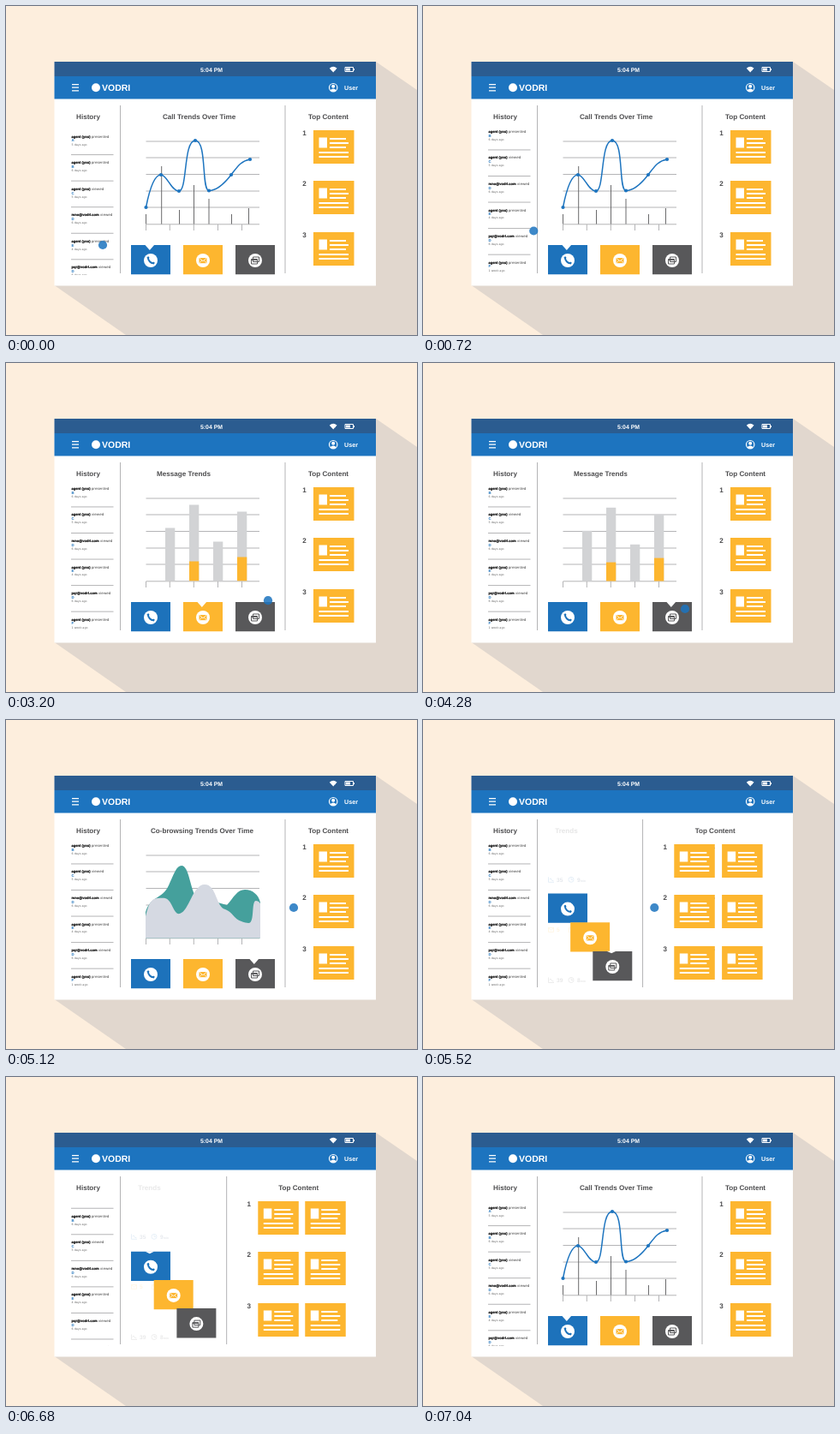
Animation of 480x384 px, one loop 7200 ms. Source, as an HTML page:

```html
<!DOCTYPE html>
<html lang="en">
<head>
<meta charset="utf-8">
<title>Dashboard walkthrough</title>
<style>
  html, body { margin: 0; width: 100%; height: 100%; overflow: hidden; background: #fdeedd; }
  svg { display: block; width: 480px; height: 384px; }
  text { font-family: "Liberation Sans", Arial, sans-serif; font-weight: bold; fill: #4d4d4f; text-rendering: geometricPrecision; }
  .head { font-size: 8.1px; }
  .mid { text-anchor: middle; }
  .white { fill: #fff; }
  .verb { font: 4.1px "DejaVu Sans", sans-serif; fill: #444; }
  .ago { font: 3.3px "DejaVu Sans", sans-serif; fill: #666; }
  .rule { stroke: #b4b4b6; fill: none; }
  .line { fill: none; stroke: #fff; }
</style>
</head>
<body>
<svg viewBox="0 0 480 384">
  <defs>
    <g id="card">
      <path d="M0 0H47.5V39H0z" fill="#fdb62f"/>
      <path d="M6.5 8.5H16V20.5H6.5z" fill="#fff"/>
      <path class="line" stroke-width="2" d="M19 10H38M19 15H41M19 20H38M6.5 26H41M6.5 31H41"/>
    </g>
    <clipPath id="listClip"><rect x="74" y="143" width="54" height="171"/></clipPath>
    <clipPath id="plotClip"><rect x="160" y="140" width="140" height="114.5"/></clipPath>
  </defs>

  <path fill="#fdeedd" d="M0 0H480V384H0z"/>
  <path fill="#e1d7ce" d="M432 65L480 98V384H140L56.5 326z"/>
  <path fill="#fff" d="M56.5 65H432V326.5H56.5z"/>
  <path fill="#2b5c90" d="M56.5 65H432V82H56.5z"/>
  <path fill="#1d74bf" d="M56.5 82H432V108.5H56.5z"/>

  <text class="white mid" x="240" y="76.5" font-size="6.9">5:04 PM</text>
  <path class="line" stroke-width="1.5" d="M378.3 73.2Q382.2 69.8 386.1 73.2M379.8 74.9Q382.2 72.9 384.6 74.9"/>
  <path class="white" d="M378.5 73Q382.2 70 386 73L382.2 77.5z"/>
  <path class="line" d="M396 71.5H405.5V76.5H396zM406.5 73V75.2"/>
  <path class="white" d="M397 72.5H402V75.5H397z"/>
  <path class="line" stroke-width="1.2" d="M77 91.6H85M77 95.2H85M77 98.8H85"/>
  <circle class="white" cx="105" cy="95.2" r="5"/>
  <text class="white" x="112" y="98.8" font-size="10.5">VODRI</text>
  <circle class="line" stroke-width="1.2" cx="382.2" cy="95.2" r="4.7"/>
  <circle class="white" cx="382.2" cy="93.8" r="2"/>
  <path class="white" d="M378.6 98.3Q382.2 94.6 385.8 98.3Q382.2 101.8 378.6 98.3z"/>
  <text class="white" x="395" y="98.2" font-size="7.2">User</text>

  <path class="rule" d="M133.5 116V312"/>
  <text class="head mid" x="96" y="132">History</text>
  <g clip-path="url(#listClip)"><g id="list"></g></g>

  <g id="chart">
    <path class="rule" stroke="#c4c4c6" d="M163.5 158H296M163.5 177H296M163.5 196.5H296M163.5 216H296M163.5 235H296M163.5 254.8H296"/>
    <path class="rule" d="M163.5 255V262M191.3 255V262M219.3 255V262M247.5 255V262M275.5 255V262"/>
    <g clip-path="url(#plotClip)">
      <path id="sticks" fill="none" stroke="#6b6b6d" d="M163.5 255V243M181.7 255V187M202.5 255V238M219.5 255V209M237 255V225M263.5 255V243M283.5 255V236"/>
      <g id="grey" fill="#d2d3d5"></g>
      <g id="gold" fill="#fdb62f"></g>
      <g id="area">
        <path fill="#45a09c" d="M163 255V224C170 204 182 210 190 193C196 180 199 170 205 170C214 170 215 198 222 206L258 216C266 207 270 198 279 198C288 198 295 204 297 213V255z"/>
        <path fill="#d5d9e2" d="M163 255V229C166 217 169 208 177 208C185 208 188 206 193 215C197 223 199 227 203 226C214 223 218 192 232 192C246 192 245 218 256 221C268 226 264 234 283 237C291 238 286 211 292 211Q295 211 297 214V255z"/>
      </g>
    </g>
    <path id="curve" pathLength="100" stroke-dasharray="100 200" fill="none" stroke="#1d74bf" stroke-width="1.5" d="M163.5 235C168 212 174 197 181 197S193 216 202 216C212 216 207 157 221 157C235 157 228 215.5 237 215.5C246 215.5 256 206 263 197C270 188 274 181 285 179"/>
    <g id="nodes" fill="#1d74bf"></g>
  </g>
  <g id="titles"></g>
  <text id="trends" class="head mid" x="167.5" y="132">Trends</text>

  <g id="stats"></g>
  <g id="tabs"></g>

  <path id="divider" class="rule" d="M0 116V312"/>
  <text id="top" class="head mid" y="132">Top Content</text>
  <g id="cards"></g>
  <circle id="dot" fill="#1d74bf" fill-opacity=".86"/>
</svg>

<script>
const LOOP = 7200, STEP = 40;
const BLUE = '#1d72bb', GOLD = '#fdb62f', GREY = '#58585a';
const $ = id => document.getElementById(id);
const ramp = (t, a, b) => Math.min(1, Math.max(0, (t - a) / (b - a)));
const mix = (a, b, p) => a + (b - a) * p;
const show = (el, v) => el.setAttribute('opacity', Math.min(1, Math.max(0, v)));
const move = (el, x, y) => el.setAttribute('transform', `translate(${x} ${y})`);

// History
const you = 'agent (you)';
const history = [
  [you, 'presented', 'A', '5 days'], [you, 'presented', 'B', '6 days'], [you, 'viewed', 'C', '5 days'],
  ['mno@vodri.com', 'viewed', 'D', '6 days'], [you, 'presented', 'E', '4 days'],
  ['pqr@vodri.com', 'viewed', 'D', '6 days'], [you, 'presented', 'F', '1 week']
];
$('list').innerHTML = history.map(([who, verb, item, age], i) => {
  const y = 153.6 + i * 30.55;
  return `<text x="76.5" y="${y}" font-size="4.1" style="fill:#111;stroke:#111;stroke-width:.2">${who}
    <tspan class="verb" stroke="none">${verb}</tspan></text>
    <text x="76.5" y="${y + 4.8}" font-size="4.3" style="fill:${BLUE}">${item}</text>
    <text class="ago" x="76.5" y="${y + 8.9}">${age} ago</text>
    <path class="rule" d="M76 ${y + 20}H125.5"/>`;
}).join('');

// Charts
const bar = (x, h) => `<rect x="${x}" y="${254.5 - h}" width="11.3" height="${h}"/>`;
$('grey').innerHTML = bar(186, 62) + bar(214, 89) + bar(242, 46) + bar(270, 81);
$('gold').innerHTML = bar(214, 23) + bar(270, 28);
const knots = [[163.5, 235], [181, 197], [202, 216], [221, 157], [237, 215.5], [263, 197], [285, 179]];
$('nodes').innerHTML = knots.map(([x, y]) => `<circle cx="${x}" cy="${y}" r="2.1"/>`).join('');

const titles = [['Call Trends Over Time', 183, 87], ['Message Trends', 176, 65], ['Co-browsing Trends Over Time', 169, 123]];
$('titles').innerHTML = titles.map(([label, x, w], i) =>
  `<clipPath id="wipe${i}"><rect x="${x}" y="122" width="${w}" height="14"/></clipPath>
   <text class="head" x="${x}" y="132" clip-path="url(#wipe${i})">${label}</text>`).join('');
const wipes = titles.map((_, i) => $('wipe' + i).firstChild);

// Buttons, centred on their round icons
const icons = [
  `<path fill="none" stroke="${BLUE}" stroke-width="2" stroke-linecap="round" d="M-3-3.2C-3.2 0 0 3.4 3.2 3.2"/>
   <path stroke="${BLUE}" stroke-width="2.2" d="M-3.9-2.6L-2.1-4M2.6 3.9L4 2.1"/>`,
  `<path fill="${GOLD}" d="M-4.5-3H4.5V3.2H-4.5z"/><path class="line" stroke-width=".8" d="M-4.5-3L0 .8L4.5-3M-4.5 3.2L-1.3 0M4.5 3.2L1.3 0"/>`,
  `<path fill="#fff" stroke="${GREY}" d="M-2.5-4H4.5V1.5H-2.5zM-4.5-1.5H2.5V4H-4.5z"/><path stroke="${GREY}" d="M-4.5-.6H2.5"/>`
];
const colors = [BLUE, GOLD, GREY];
$('tabs').innerHTML = icons.map((icon, i) =>
  `<g><path fill="${colors[i]}" d="M-23-18H23V16.3H-23z"/><path class="white" d="M-5.5-18.3H5.5L0-12z"/>
   <circle class="white" r="8"/>${icon}</g>`).join('');
const tabs = [...$('tabs').children];

const counts = [['35', '9', 'min'], ['5', '2', ''], ['39', '8', 'min']];
const graph = '<path d="M.5-3V3H7M1.5 0L3-1.5L4.5 1L6.5 1.5"/>';
const clock = '<circle cx="27" r="3"/><path d="M27-2V0H29"/>';
const mail = '<path d="M.5-2.5H6.5V2.5H.5zL3.5.5L6.5-2.5"/>';
const diary = '<path d="M24.5-2.5H29.5V3H24.5zM24.5-1H29.5M26-3.3V-2M28-3.3V-2"/>';
$('stats').innerHTML = counts.map(([a, b, unit], i) =>
  `<g transform="translate(146 ${186.3 + i * 58.6})"><g fill="none" stroke="${colors[i]}" stroke-width=".8">${i === 1 ? mail + diary : graph + clock}</g>
   <g font-size="6.6"><text x="10" y="2.4" style="fill:${i ? colors[i] : '#44587a'}">${a}</text>
   <text x="34" y="2.4" style="fill:${i ? colors[i] : '#44587a'}">${b}<tspan font-size="3.6">${unit}</tspan></text></g></g>`).join('');

// Content cards: second column lies beneath the first
const rows = [145, 204, 264];
const column = first => '<g>' + rows.map((y, i) =>
  `<use href="#card" y="${y}"/><text class="head mid" x="-10.5" y="${y + 6}">${first + i}</text>`).join('') + '</g>';
$('cards').innerHTML = column(4) + column(1);
const [back, front] = $('cards').children;

const path = [
  [0, 113, 279], [280, 113, 259], [680, 113, 259], [1000, 243, 287], [1920, 243, 287], [2480, 306, 264],
  [3040, 306, 264], [3320, 306, 287], [4560, 306, 287], [5120, 336, 219], [5200, 336, 219], [5760, 221, 219], [6400, 221, 219]
];

function drawDot(t) {
  const dot = $('dot');
  show(dot, t < 6400 ? 1 : 0);
  const k = path.findIndex(p => p[0] > t);
  if (k < 1) return;
  const [a, b] = [path[k - 1], path[k]], p = ramp(t, a[0], b[0]);
  const pulse = Math.sin(Math.PI * ramp(t, 1160, 1480)) + Math.sin(Math.PI * ramp(t, 3520, 3840));
  dot.setAttribute('cx', mix(a[1], b[1], p));
  dot.setAttribute('cy', mix(a[2], b[2], p));
  dot.setAttribute('r', 5.1 + 2 * pulse);
}

function draw(t) {
  const reset = ramp(t, 6400, 7040);
  const open = ramp(t, 5200, 5760) - reset;
  const lineOn = 1 - ramp(t, 1160, 1680) + reset;
  const barsOut = ramp(t, 4000, 4640) ** 4;
  const steady = ramp(t, 1960, 2760) - barsOut;
  const areaIn = t < 6400 ? ramp(t, 4560, 5120) : 0;

  move($('list'), 0, -36.2 * (ramp(t, 0, 280) - reset));

  $('curve').setAttribute('stroke-dashoffset', 100 * (1 - lineOn));
  show($('curve'), lineOn > 0 ? 1 : 0);
  [...$('nodes').children].forEach((n, i) => show(n, lineOn > i / 6 - .01 && lineOn > 0 ? 1 : 0));
  move($('sticks'), 0, 70 * (1 - lineOn));
  move($('grey'), 0, 90 * ((1 - ramp(t, 1640, 2760)) ** 3 + barsOut));
  move($('gold'), 0, 30 * (1 - steady));
  move($('area'), 0, 87 * (1 - areaIn) ** 2);
  show($('chart'), 1 - 2 * open);
  show($('titles'), 1 - 2 * open);
  [lineOn, steady, areaIn].forEach((p, i) => wipes[i].setAttribute('width', titles[i][2] * Math.max(0, p)));

  const first = ramp(t, 1160, 1480), second = ramp(t, 3520, 3840);
  const notches = [1 - first + reset, first - second, second - ramp(t, 5200, 5760)];
  tabs.forEach((tab, i) => {
    move(tab, mix(169 + 61 * i, 169, open), mix(297, 163.2 + 59 * i, open));
    tab.children[1].setAttribute('transform', `translate(-1.2 -18.3) scale(1 ${notches[i]}) translate(0 18.3)`);
  });
  show($('trends'), 2 * open - 1);
  show($('stats'), 2 * open - 1);

  move($('divider'), mix(326, 204.5, open), 0);
  $('top').setAttribute('x', mix(376.5, 314.7, open));
  move(front, mix(359, 244, open), 0);
  move(back, mix(359, 341.7, open), 0);
  show(back, 4 * open);
  drawDot(t);
}

const start = performance.now();
function tick() {
  const t = (performance.now() - start) % LOOP;
  draw(Math.floor(t / STEP) * STEP);
  requestAnimationFrame(tick);
}
tick();
</script>
</body>
</html>
```
